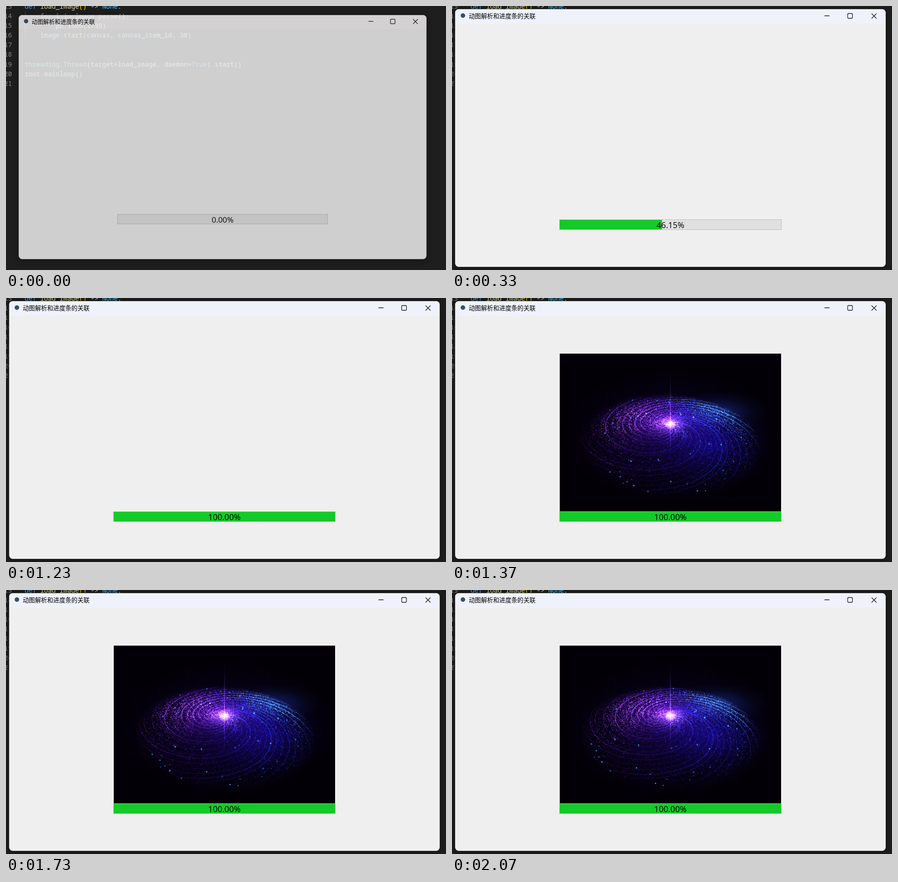
Write an HTML page with a canvas that moves like this. It is 968 px wide and 579 px high and loops after 2110 ms.

```html
<!DOCTYPE html>
<html lang="zh">
<head>
<meta charset="utf-8">
<style>
html, body { margin: 0; width: 100%; height: 100%; overflow: hidden; background: #1e1e1e; }
#stage { position: absolute; left: 0; top: 0; width: 968px; height: 579px; overflow: hidden; background: #1e1e1e; }
pre { position: absolute; top: -10px; margin: 0; font: 14.22px/21.1px "Noto Sans Mono", "DejaVu Sans Mono", monospace; color: #d4d4d4; }
#nums { right: 955px; text-align: right; color: #858585; }
#code { left: 41px; }
#guide { position: absolute; left: 42px; top: 12px; width: 1px; height: 63px; background: #444; }
.k { color: #569cd6; } .f { color: #dcdcaa; } .b { color: #ffd700; } .v { color: #9cdcfe; }
.n { color: #4fc1ff; } .c { color: #c586c0; } .t { color: #4ec9b0; }
#win { position: absolute; left: 7px; top: 7px; width: 947px; height: 565px; border-radius: 8px; overflow: hidden;
  background: #efefef; box-shadow: 0 0 0 1px #3a3a3a, 0 2px 14px 2px rgba(0,0,0,.35); }
#bar { position: absolute; width: 100%; height: 32px; }
#icon { position: absolute; left: 12px; top: 9px; width: 10px; height: 10px; border-radius: 50%; background: #34506e; }
#title { position: absolute; left: 30px; top: 0; font: 13.36px/30px "Noto Sans CJK SC", "Noto Sans CJK", sans-serif; color: #000; white-space: nowrap; }
svg { position: absolute; left: 0; top: 0; fill: none; stroke: #111; stroke-width: 1.3; }
canvas { position: absolute; left: 230px; top: 115px; }
#track { position: absolute; left: 229px; top: 461px; width: 487px; height: 21px; border: 1px solid #bcbcbc; background: #e0e0e0; }
#fill { height: 100%; background: #14c92a; }
#pct { position: absolute; left: 0; top: 0; width: 100%; text-align: center; font: 18.1px/22px "Open Sans", "Noto Sans", sans-serif; color: #000; }
</style>
</head>
<body>
<div id="stage">
<pre id="nums">13
14
15
16
17
18
19
20
21</pre>
<div id="guide"></div>
<pre id="code"><span class="k">def</span> <span class="f">load_image</span><span class="b">()</span> -> <span class="n">None</span>:
    <span class="c">for</span> <span class="v">i</span> <span class="c">in</span> <span class="v">image</span>.<span class="f">parse</span><span class="b">()</span>:
        <span class="v">pb</span>.<span class="f">load</span><span class="b">(</span><span class="v">i</span>/39<span class="b">)</span>
    <span class="v">image</span>.<span class="f">start</span><span class="b">(</span><span class="v">canvas</span>, <span class="v">canvas_item_id</span>, 30<span class="b">)</span>


<span class="t">threading</span>.<span class="t">Thread</span>(target=load_image, daemon=<span class="k">True</span>).start()
root.mainloop()</pre>
<div id="win">
  <div id="bar"></div>
  <div id="icon"></div>
  <div id="title">动图解析和进度条的关联</div>
  <svg width="947" height="32">
    <path d="M812.5 14.5h11M916 9.5l11 11m0-11l-11 11"/>
    <rect x="863.5" y="9.5" width="10.5" height="10.5" rx="1.5"/>
  </svg>
  <canvas id="galaxy" width="487" height="346"></canvas>
  <div id="track"><div id="fill"></div><div id="pct"></div></div>
</div>
</div>
<script>
const $ = id => document.getElementById(id);
const LOOP = 2110, SHOW = 1270, TAU = Math.PI * 2, ARMS = 20, STEPS = 39;
const ctx = $('galaxy').getContext('2d');

let seed = 7;
const rnd = () => (seed = seed * 16807 % 2147483647) / 2147483647;
const twist = r => 5.2 * r ** 0.75;

const arms = Array.from({ length: ARMS }, (_, i) => (
  { a: (i + 0.5 * rnd()) * TAU / ARMS, width: 0.7 + 1.2 * rnd() ** 2, g: 0.35 + 0.5 * rnd() }));
const dust = Array.from({ length: 12000 }, (_, i) => {
  const r = 0.02 + rnd() ** 0.7, arm = arms[i % ARMS];
  const spread = (rnd() + rnd() + rnd() - 1.5) * 0.24;
  return { r, a: arm.a + twist(r) + spread, g: 0.3 + rnd() * 0.8, size: 0.8 + 0.6 * rnd() };
});
const sparks = Array.from({ length: 130 }, () => (
  { r: 0.2 + 0.8 * rnd() ** 0.6, a: rnd() * TAU, size: 0.5 + 1.6 * rnd() ** 3, g: 0.4 + rnd() * 0.6 }));

// Tilted disc in perspective, centred on the star
function place(r, a) {
  const x = 195 * r * Math.cos(a);
  return [x, r * (108 * Math.sin(a) + 45) + 0.03 * x];
}

const lobe = (a, centre, power) => Math.max(0, Math.cos(a - centre)) ** power;

// Colour depends on the place in the disc, not on the particle
function tint(r, a, gain) {
  const cyan = lobe(a, -0.9, 4) * Math.min(1, r * r * 1.6);
  const pink = lobe(a, 3.7, 2) * 4 * r * (1 - r);
  const core = Math.max(0, 1 - r * 3.5);
  const hue = 252 + 20 * Math.cos(a - 3.5) - 36 * cyan + 8 * pink + 12 * core;
  const light = 48 + 14 * cyan + 14 * pink + 30 * core;
  const fade = Math.min(1, (1.04 - r) * 6);
  const alpha = gain * fade * (0.3 + 0.3 * lobe(a, -1.57, 1) + 0.16 * lobe(a, 0.4, 2) + 0.4 * cyan + 0.35 * pink + 0.25 * core);
  return `hsla(${hue | 0},75%,${light | 0}%,${alpha.toFixed(3)})`;
}

function glow(x, y, rx, ry, rgb, alpha) {
  ctx.save();
  ctx.translate(x, y);
  ctx.scale(rx, ry);
  const g = ctx.createRadialGradient(0, 0, 0, 0, 0, 1);
  [1, 0.55, 0.17, 0].forEach((k, i) => g.addColorStop(i / 3, `rgba(${rgb},${alpha * k})`));
  ctx.fillStyle = g;
  ctx.fillRect(-1, -1, 2, 2);
  ctx.restore();
}

function drawGalaxy(turn) {
  ctx.setTransform(1, 0, 0, 1, 0, 0);
  ctx.globalCompositeOperation = 'source-over';
  ctx.fillStyle = '#020006';
  ctx.fillRect(0, 0, 487, 346);
  ctx.translate(243.5, 155);
  ctx.globalCompositeOperation = 'lighter';
  glow(5, 25, 245, 150, '40,10,150', 0.4);
  glow(95, 40, 130, 95, '25,5,190', 0.38);
  glow(-20, -10, 150, 60, '100,30,210', 0.45);
  glow(105, -28, 110, 45, '30,80,200', 0.4);

  for (const arm of arms) {
    const at = r => arm.a + twist(r) + turn;
    ctx.lineWidth = arm.width;
    for (let i = 2; i < 60; i++) {
      const r = i / 60, r2 = (i + 1) / 60;
      ctx.strokeStyle = tint(r, at(r), arm.g);
      ctx.beginPath();
      ctx.moveTo(...place(r, at(r)));
      ctx.lineTo(...place(r2, at(r2)));
      ctx.stroke();
    }
  }
  for (const d of dust) {
    const a = d.a + turn, [x, y] = place(d.r, a);
    ctx.fillStyle = tint(d.r, a, d.g);
    ctx.fillRect(x, y, d.size, d.size);
  }
  for (const s of sparks) {
    const [x, y] = place(s.r, s.a + turn);
    ctx.fillStyle = `rgba(60,150,225,${s.g})`;
    ctx.beginPath();
    ctx.arc(x, y, s.size, 0, TAU);
    ctx.fill();
  }
  glow(0, 0, 40, 26, '170,80,255', 0.55);
  glow(0, 0, 13, 12, '255,235,255', 1);
  glow(0, -17, 2, 100, '150,100,240', 0.6);
}

// Parsed images over time: quick at first, then steady
function parsed(t) {
  const knots = [[0, 0], [330, 18], [670, 27], [1150, STEPS]];
  for (let i = 1; i < knots.length; i++) {
    const [t0, n0] = knots[i - 1], [t1, n1] = knots[i];
    if (t < t1) return Math.floor(n0 + (n1 - n0) * (t - t0) / (t1 - t0) + 1e-6);
  }
  return STEPS;
}

function render(t) {
  const left = (1 - Math.min(1, t / 200)) ** 3;
  $('win').style.transform = left ? `translate(${-4 * left}px,${-2 * left}px) scale(${1 - 0.053 * left})` : 'none';
  $('win').style.opacity = 1 - 0.15 * Math.max(0, 1 - t / 100);
  // The title bar turns from neutral to blue as the window opens
  $('bar').style.background = `rgb(${239 + 4 * left},${242 - left},${251 - 9 * left})`;
  const pct = (parsed(t) / STEPS * 100).toFixed(2) + '%';
  $('fill').style.width = pct;
  $('pct').textContent = pct;
  $('galaxy').style.visibility = t < SHOW ? 'hidden' : 'visible';
  if (t >= SHOW) drawGalaxy((t - SHOW) * 0.0007);
}

const start = performance.now();
let last = -1;
function tick() {
  const t = (performance.now() - start) % LOOP;
  const step = Math.floor((t + 3.4) * 0.03);
  if (step !== last) render(Math.round(step * 10 / 3) * 10);
  last = step;
  requestAnimationFrame(tick);
}
tick();
</script>
</body>
</html>
```
